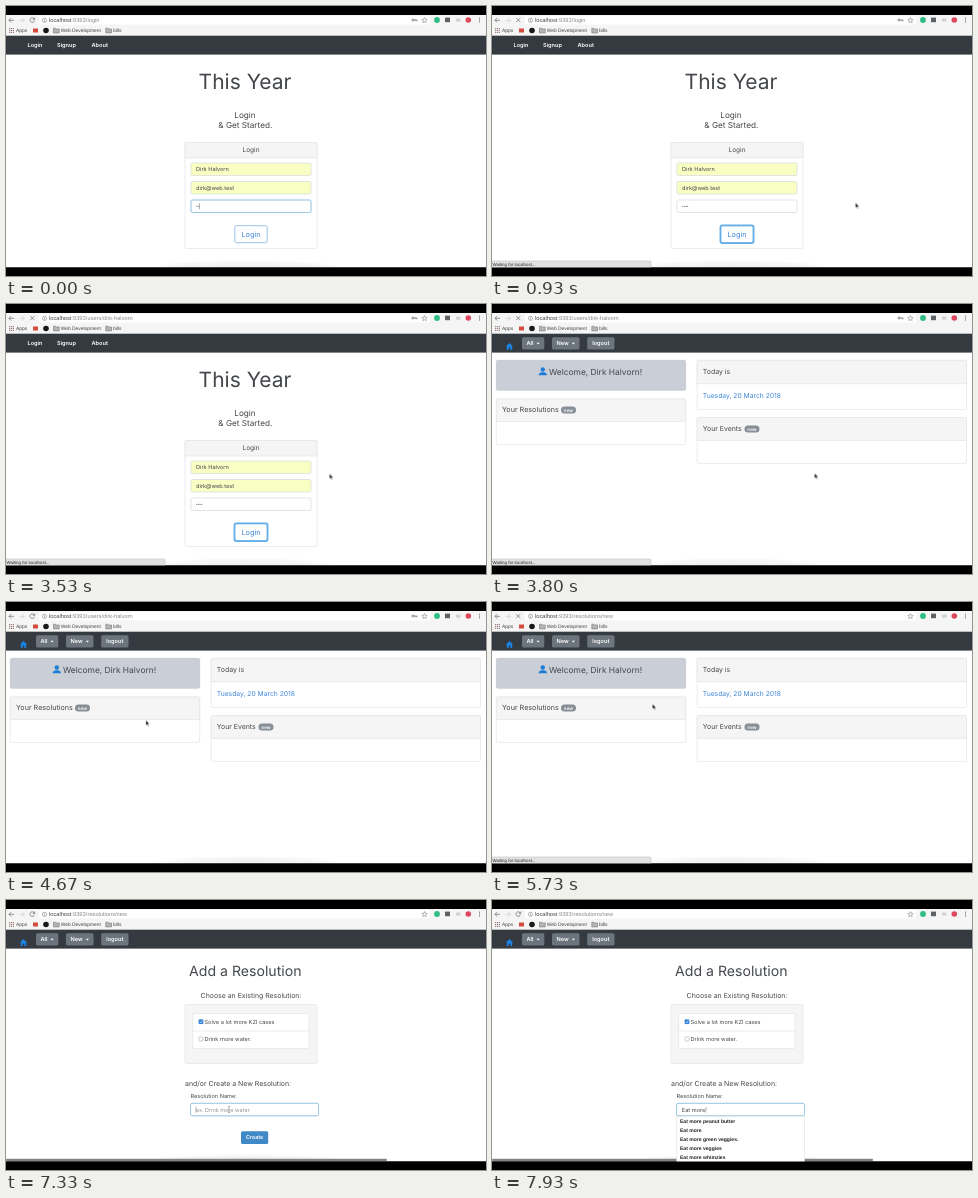
An HTML page that plays this animation: 480x270 px, repeating every 8 s.

```html
<!DOCTYPE html>
<html lang="en">
<head>
<meta charset="utf-8">
<title>Login and add a resolution</title>
<style>
html, body { margin: 0; width: 100%; height: 100%; overflow: hidden; background: #000; }
svg { display: block; width: 480px; height: 270px; }
text { font: 5.6px Inter, sans-serif; fill: #43474b; text-rendering: geometricPrecision; white-space: pre; }
.mid { text-anchor: middle; }
.ui text { font: 4.9px "Liberation Sans", Arial, sans-serif; fill: #444; }
.ui .url { font-size: 5.7px; }
.ui .path { fill: #8a8a8a; }
.ui .wait { font-size: 4.4px; fill: #222; }
.list text { font: bold 5.05px "Liberation Sans", Arial, sans-serif; fill: #222; }
.bold { font-weight: 600; fill: #fff; }
.tag { font-size: 4.6px; }
.h1 { font-size: 21px; }
.h2 { font-size: 14.1px; }
.lead { font-size: 8.2px; }
.sub { font-size: 6.95px; }
.link { font-size: 6.75px; fill: #3f86d8; }
.hint { font-size: 5.5px; fill: #8f969c; }
.card { fill: #fff; stroke: #e1e1e1; stroke-width: .6; }
.head { fill: #f5f5f5; stroke: #e1e1e1; stroke-width: .6; }
.field { fill: #fff; stroke: #cfd4d9; stroke-width: .6; }
.auto { fill: #f9fec3; }
.focus { fill: none; stroke: #8cc4e8; stroke-width: .8; }
.btn { fill: #6c757d; }
.line { fill: none; stroke: #666; stroke-width: .7; }
.thin { stroke-width: .5; }

/* 8 s loop, 1% = 80 ms */
.a { animation: 8s step-end infinite; }
.login { animation-name: login; }
.home { animation-name: home; }
.add { animation-name: add; }
.url1 { animation-name: url1; }
.url2 { animation-name: url2; }
.url3 { animation-name: url3; }
.key { animation-name: key; }
.busy { animation-name: busy; }
.idle { animation-name: idle; }
.dot3 { animation-name: dot3; }
.dot4 { animation-name: dot4; }
.pass { animation-name: pass; }
.passcaret { animation-name: passcaret; }
.pressed { animation-name: pressed; }
.tick { animation-name: tick; }
.active { animation-name: active; }
.typed { animation-name: typed; }
.empty { animation-name: empty; }
.caret { animation-name: caret; }
.beam { animation-name: beam; }
.t2 { animation-name: t2; }
.t3 { animation-name: t3; }
.t4 { animation-name: t4; }
.t5 { animation-name: t5; }
.mouse { animation: pointer 8s step-end infinite, move 8s linear infinite; }

@keyframes login { 0% { opacity: 1 } 47.4%, 100% { opacity: 0 } }
@keyframes home { 0% { opacity: 0 } 47.4% { opacity: 1 } 73.3%, 100% { opacity: 0 } }
@keyframes add { 0% { opacity: 0 } 73.3%, 100% { opacity: 1 } }
@keyframes url1 { 0% { opacity: 1 } 42.4%, 100% { opacity: 0 } }
@keyframes url2 { 0% { opacity: 0 } 42.4% { opacity: 1 } 71.5%, 100% { opacity: 0 } }
@keyframes url3 { 0% { opacity: 0 } 71.5%, 100% { opacity: 1 } }
@keyframes key { 0% { opacity: 1 } 71.5%, 100% { opacity: 0 } }
@keyframes busy { 0% { opacity: 0 } 6.6% { opacity: 1 } 50.7% { opacity: 0 } 60.8% { opacity: 1 } 74.1%, 100% { opacity: 0 } }
@keyframes idle { 0% { opacity: 1 } 6.6% { opacity: 0 } 50.7% { opacity: 1 } 60.8% { opacity: 0 } 74.1%, 100% { opacity: 1 } }
@keyframes dot3 { 0% { opacity: 0 } .8%, 100% { opacity: 1 } }
@keyframes dot4 { 0% { opacity: 0 } 2.4%, 100% { opacity: 1 } }
@keyframes pass { 0% { opacity: 1 } 5.8%, 100% { opacity: 0 } }
@keyframes passcaret { 0% { transform: none } .8% { transform: translateX(1.6px) } 2.4%, 100% { transform: translateX(3.2px) } }
@keyframes pressed { 0% { opacity: 0 } 5.8%, 100% { opacity: 1 } }
@keyframes tick { 0% { opacity: 0 } 84.9%, 100% { opacity: 1 } }
@keyframes active { 0% { opacity: 0 } 90.7%, 100% { opacity: 1 } }
@keyframes typed { 0% { opacity: 0 } 94%, 100% { opacity: 1 } }
@keyframes empty { 0% { opacity: 1 } 94%, 100% { opacity: 0 } }
@keyframes caret {
  0% { transform: none } 94% { transform: translateX(3.4px) } 94.9% { transform: translateX(8.6px) }
  96.5% { transform: translateX(15px) } 97.4% { transform: translateX(20.6px) } 99%, 100% { transform: translateX(24px) }
}
@keyframes beam { 0% { opacity: 0 } 89% { opacity: 1 } 94%, 100% { opacity: 0 } }
@keyframes t2 { 0% { fill-opacity: 0 } 94.9%, 100% { fill-opacity: 1 } }
@keyframes t3 { 0% { fill-opacity: 0 } 96.5%, 100% { fill-opacity: 1 } }
@keyframes t4 { 0% { fill-opacity: 0 } 97.4%, 100% { fill-opacity: 1 } }
@keyframes t5 { 0% { fill-opacity: 0 } 99%, 100% { fill-opacity: 1 } }
@keyframes pointer { 0% { opacity: 0 } 3.3% { opacity: 1 } 89%, 100% { opacity: 0 } }
@keyframes move {
  0%, 3.3% { transform: translate(236px, 206px) }
  5.8%, 6.6% { transform: translate(245px, 228px) }
  10.8%, 41.7% { transform: translate(363.5px, 196.7px) }
  44.1%, 47.4% { transform: translate(323.5px, 169.7px) }
  53.3%, 55% { transform: translate(274px, 146px) }
  60%, 60.8% { transform: translate(76px, 105px) }
  65%, 72.5% { transform: translate(160.5px, 102px) }
  79%, 85.3% { transform: translate(196.5px, 124px) }
  89%, 100% { transform: translate(222px, 209px) }
}
</style>
</head>
<body>
<svg viewBox="0 0 480 270">
  <defs>
    <radialGradient id="glow">
      <stop offset="0" stop-opacity=".06"/>
      <stop offset=".7" stop-opacity=".035"/>
      <stop offset="1" stop-opacity="0"/>
    </radialGradient>
    <ellipse id="shade" cx="240" cy="260" rx="94" ry="6" fill="url(#glow)"/>
    <path id="folder" d="M0 0h2l.7.8h3v3.900h-5.700z" fill="#b5b5b5" stroke="#777" stroke-width=".6"/>
    <g id="badge">
      <rect width="15" height="7" rx="3.500" fill="#868e96"/>
      <text class="bold tag mid" x="7.500" y="5">new</text>
    </g>
    <g id="nav">
      <path d="M13.800 42.600l3.700-3.600 3.700 3.600h-1v3.400h-1.900v-2.300h-1.600v2.300h-1.900v-3.400z" fill="#1c82e0"/>
      <rect class="btn" x="30" y="33.300" width="22.300" height="12.300" rx="1.500"/>
      <text class="bold" x="34.500" y="41.200">All</text>
      <path d="M44.500 38.700h3.200l-1.600 1.800z" fill="#fff"/>
      <rect class="btn" x="60" y="33.300" width="27.500" height="12.300" rx="1.500"/>
      <text class="bold" x="64.500" y="41.200">New</text>
      <path d="M79.800 38.700h3.200l-1.600 1.800z" fill="#fff"/>
      <rect class="btn" x="95.200" y="33.300" width="27.300" height="12.300" rx="1.500"/>
      <text class="bold mid" x="108.800" y="41.200">logout</text>
    </g>
  </defs>

  <rect y="9" width="480" height="252.500" fill="#fff"/>

  <!-- browser bars -->
  <g class="ui">
    <rect y="9" width="480" height="21" fill="#f5f5f5"/>
    <rect x="33" y="10" width="391" height="8.600" rx="1" fill="#fff"/>
    <path class="line" d="M8 14.300h-5m2.200-2.200-2.200 2.200 2.200 2.200"/>
    <path class="line" style="stroke:#ccc" d="M13.500 14.300h5m-2.200-2.200 2.200 2.200-2.200 2.200"/>
    <path class="line a idle" d="M28.300 13a2.300 2.300 0 1 0 .2 1.700M28.700 11.600v1.800h-1.800"/>
    <path class="line a busy" d="M24.300 12.100l4 4m0-4-4 4"/>
    <circle class="line thin" cx="38.500" cy="14.300" r="2.100"/>
    <path class="line thin" d="M38.500 13v.6m0 .4v1.600"/>
    <text class="url" x="43" y="16.100">localhost<tspan class="path">:9393/</tspan></text>
    <text class="url path a url1" x="81.500" y="16.100">login</text>
    <text class="url path a url2" x="81.500" y="16.100">users/dirk-halvorn</text>
    <text class="url path a url3" x="81.500" y="16.100">resolutions/new</text>
    <g class="a key">
      <circle class="line" cx="407" cy="14" r="1.100"/>
      <path class="line" d="M408 14h3v1.300m-1.200-1.300v1"/>
    </g>
    <path class="line thin" d="M418.500 11.600l.8 1.700 1.800.2-1.300 1.300.3 1.800-1.600-.9-1.600.9.300-1.800-1.300-1.300 1.800-.2z"/>
    <circle cx="431" cy="14" r="2.900" fill="#2fbd85"/>
    <rect x="439" y="11.600" width="5" height="4.600" fill="#5d6267"/>
    <rect x="450" y="12.600" width="4.500" height="3" fill="#d2d2d2"/>
    <circle cx="462.300" cy="14" r="2.800" fill="#dc485c"/>
    <path d="M473.500 11.700v5" stroke="#666" stroke-dasharray="1 .9"/>
    <path d="M3 22.600h5m-5 1.900h5m-5 1.900h5" stroke="#a08080" stroke-width="1.200" stroke-dasharray="1.200 .7"/>
    <text x="10" y="26.200">Apps</text>
    <rect x="27" y="22.500" width="5" height="4" fill="#d54b3e"/>
    <circle cx="40" cy="24.500" r="2.800" fill="#191919"/>
    <use href="#folder" x="47.500" y="22.200"/>
    <text x="54.700" y="26.200">Web Development</text>
    <use href="#folder" x="99.800" y="22.200"/>
    <text x="107" y="26.200">bills</text>
  </g>

  <rect y="29.700" width="480" height="18.900" fill="#343a40"/>

  <g class="a login">
    <text class="bold" x="21.500" y="41.200">Login</text>
    <text class="bold" x="51" y="41.200">Signup</text>
    <text class="bold" x="85.500" y="41.200">About</text>
    <text class="h1 mid" x="239" y="83.300">This Year</text>
    <text class="lead mid" x="239" y="111.700">Login</text>
    <text class="lead mid" x="239.300" y="122.400">&amp; Get Started.</text>
    <rect class="card" x="179" y="136.500" width="132" height="106" rx="1.500"/>
    <path class="head" d="M179 152v-14q0-1.500 1.500-1.500h129q1.500 0 1.500 1.500v14z"/>
    <text class="mid" x="245" y="146" style="font-size:6.500px">Login</text>
    <rect class="field auto" x="185" y="157" width="120" height="12.500" rx="1.500"/>
    <text x="190" y="165.200">Dirk Halvorn</text>
    <rect class="field auto" x="185" y="175.500" width="120" height="12.500" rx="1.500"/>
    <text x="190" y="183.800">dirk@web.test</text>
    <rect class="field" x="185" y="194" width="120" height="12.500" rx="1.500"/>
    <g fill="#777">
      <circle cx="190.800" cy="200.300" r=".6"/>
      <circle cx="192.400" cy="200.300" r=".6"/>
      <circle class="a dot3" cx="194" cy="200.300" r=".6"/>
      <circle class="a dot4" cx="195.600" cy="200.300" r=".6"/>
    </g>
    <g class="a pass">
      <rect class="focus" x="185" y="194" width="120" height="12.500" rx="1.500"/>
      <path class="line thin a passcaret" d="M193.500 197.300v6"/>
    </g>
    <rect x="228.800" y="219.700" width="32.400" height="17" rx="1.800" fill="#fff" stroke="#7fb4e2" stroke-width=".8"/>
    <rect class="a pressed" x="228.400" y="219.300" width="33.200" height="17.800" rx="2" fill="none" stroke="#62aeea" stroke-width="1.700"/>
    <text class="link mid" x="245" y="230.500" style="font-size:7.300px">Login</text>
    <use href="#shade"/>
  </g>

  <g class="a home">
    <use href="#nav"/>
    <rect x="4.300" y="56.300" width="189.400" height="30" rx="1.500" fill="#cacfd7" stroke="#bcc2ca" stroke-width=".6"/>
    <circle cx="50.800" cy="65.500" r="2.200" fill="#1c7cd6"/>
    <path d="M46.600 71.300q0-2.600 3-3.100h2.400q3 .5 3 3.100z" fill="#1c7cd6"/>
    <text x="57" y="70.900" style="font-size:8.400px">Welcome, Dirk Halvorn!</text>

    <rect class="card" x="4.300" y="95" width="189.400" height="45.500" rx="1.500"/>
    <path class="head" d="M4.300 117.500v-21q0-1.500 1.500-1.500h186.400q1.500 0 1.500 1.500v21z"/>
    <text class="sub" x="10" y="108" style="font-size:7.200px">Your Resolutions</text>
    <use href="#badge" x="69" y="102.600"/>

    <rect class="card" x="205.200" y="56.300" width="269.300" height="49.200" rx="1.500"/>
    <path class="head" d="M205.200 79.700v-21.900q0-1.500 1.500-1.500h266.300q1.500 0 1.500 1.500v21.900z"/>
    <text class="sub" x="210.800" y="70">Today is</text>
    <text class="link" x="210.800" y="94.400">Tuesday, 20 March 2018</text>

    <rect class="card" x="205.200" y="113.500" width="269.300" height="45.900" rx="1.500"/>
    <path class="head" d="M205.200 136.500v-21.500q0-1.500 1.500-1.500h266.300q1.500 0 1.500 1.500v21.500z"/>
    <text class="sub" x="210.800" y="127">Your Events</text>
    <use href="#badge" x="252.500" y="121.600"/>
    <use href="#shade"/>
  </g>

  <g class="a add">
    <use href="#nav"/>
    <text class="h2 mid" x="239.300" y="76.200">Add a Resolution</text>
    <text class="sub mid" x="245" y="98.200">Choose an Existing Resolution:</text>
    <rect class="head" x="179" y="104.500" width="132" height="59" rx="1.500"/>
    <rect class="card" x="186.700" y="113.500" width="116.300" height="35" rx="1"/>
    <path d="M186.700 131h116.300" stroke="#e1e1e1" stroke-width=".6"/>
    <rect class="field" style="stroke:#aaa" x="193" y="119.700" width="4" height="4" rx=".7"/>
    <rect class="field" style="stroke:#aaa" x="193" y="137" width="4" height="4" rx=".7"/>
    <g class="a tick">
      <rect x="192.700" y="119.400" width="4.600" height="4.600" rx=".8" fill="#2f80dc"/>
      <path d="M193.700 121.800l1 1 1.700-2.200" fill="none" stroke="#fff" stroke-width=".7"/>
    </g>
    <text x="198.500" y="123.500">Solve a lot more KZI cases</text>
    <text x="198.500" y="140.800">Drink more water.</text>
    <text class="sub" x="179" y="186">and/or Create a New Resolution:</text>
    <text x="184.500" y="197.500">Resolution Name:</text>
    <rect class="field" x="184.500" y="203.300" width="128" height="12.500" rx="1.500"/>
    <text class="hint a empty" x="189.800" y="211.500">ex. Drink more water.</text>
    <rect x="235" y="231.300" width="27.200" height="12.600" rx="1.500" fill="#3f8ac6"/>
    <text class="bold mid" x="248.600" y="239.300" style="font-size:5.400px">Create</text>
    <use href="#shade"/>
    <rect y="258.800" width="381" height="2.300" rx="1" fill="#828282"/>

    <g class="a active">
      <rect class="focus" x="184.500" y="203.300" width="128" height="12.500" rx="1.500"/>
      <path class="line thin a caret" d="M190 206.800v5.800"/>
    </g>
    <g class="a typed">
      <text x="189.800" y="211.500">E<tspan class="a t2">at</tspan><tspan class="a t3"> m</tspan><tspan class="a t4">or</tspan><tspan class="a t5">e</tspan></text>
      <g class="list">
        <rect class="card" x="184.800" y="216.500" width="127.700" height="48"/>
        <text x="188" y="223.300">Eat more peanut butter</text>
        <text x="188" y="232.300">Eat more</text>
        <text x="188" y="241.300">Eat more green veggies.</text>
        <text x="188" y="250.300">Eat more veggies</text>
        <text x="188" y="259.300">Eat more whimzies</text>
      </g>
    </g>
    <path class="line thin a beam" d="M222 206.500h2m-1 0v6m-1 0h2"/>
  </g>

  <g class="ui a busy">
    <rect x="-1" y="255" width="160" height="8" rx="1" fill="#e2e2e2" stroke="#c4c4c4" stroke-width=".6"/>
    <text class="wait" x=".5" y="260.200">Waiting for localhost...</text>
  </g>

  <path class="mouse" d="M0 0v5l1.200-1 .8 1.900.9-.4-.8-1.800h1.500z" fill="#111" stroke="#fff" stroke-width=".4"/>
  <rect y="261.500" width="480" height="8.500"/>
</svg>
</body>
</html>
```
